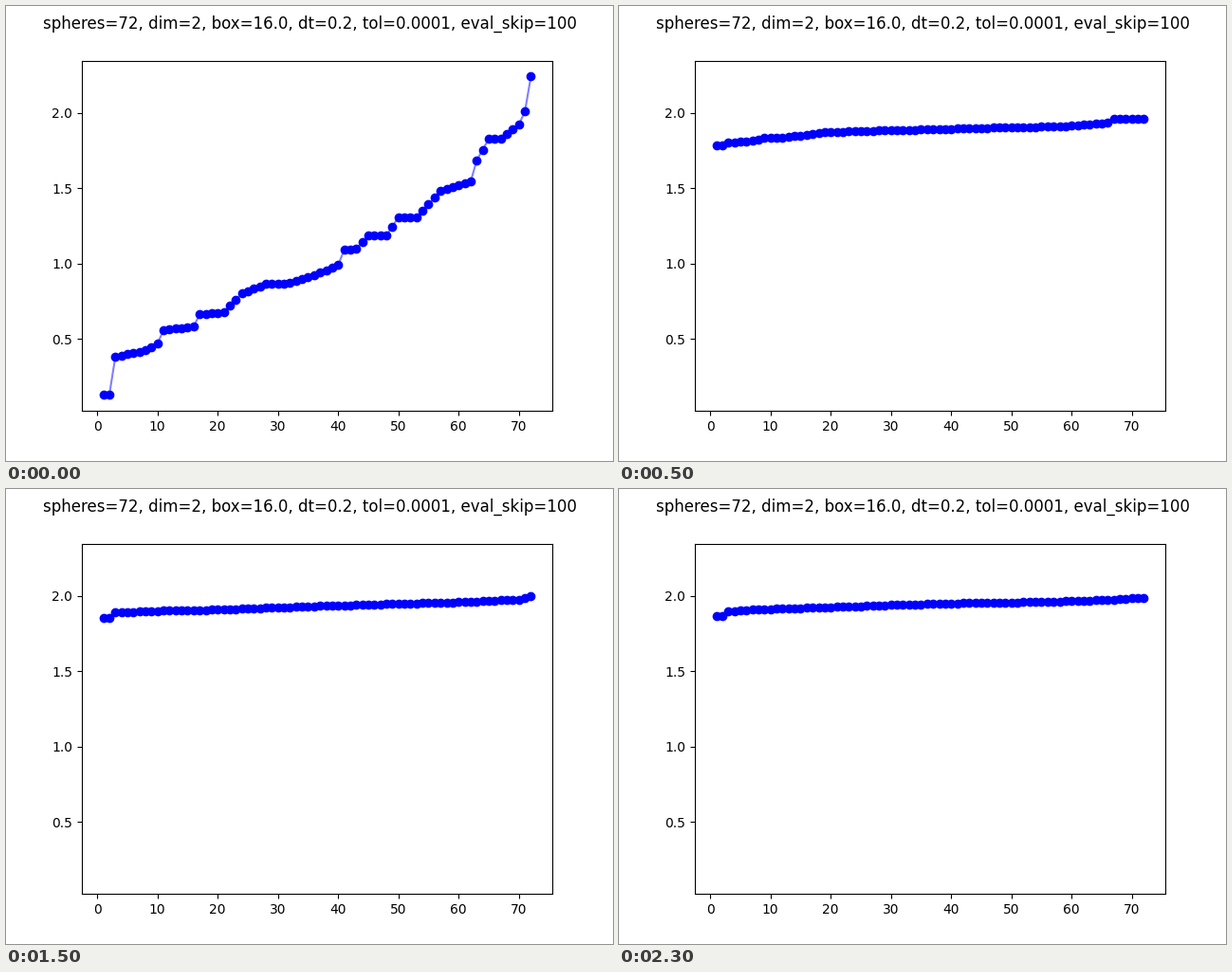
A matplotlib script for the animation above (2500 ms loop, 640 px wide and 480 px high).

```python
import numpy as np
import matplotlib.pyplot as plt
from matplotlib.animation import FuncAnimation

COUNT = 72
index = np.arange(1, COUNT + 1)


def curve(*knots):
    """Sorted distances, linear between (index, value) knots, flat outside."""
    return np.interp(index, *zip(*knots))


# Random start: an uneven climb with jumps between plateaus.
start = curve((2, .128), (3, .38), (8, .425), (10, .47), (11, .558),
              (16, .583), (17, .663), (21, .677), (24, .803), (28, .865),
              (32, .87), (36, .922), (40, .99), (41, 1.092), (43, 1.098),
              (45, 1.187), (48, 1.187), (50, 1.307), (53, 1.307),
              (57, 1.482), (62, 1.545), (63, 1.685), (65, 1.828),
              (67, 1.828), (70, 1.922), (71, 2.01), (72, 2.242))

# Later stages: nearly straight, with loose ends.
spread = curve((2, 1.783), (3, 1.802), (7, 1.815), (9, 1.834), (12, 1.836),
               (19, 1.871), (24, 1.879), (48, 1.903), (59, 1.911),
               (66, 1.935), (67, 1.96), (72, 1.962))
settle = curve((4, 1.865), (5, 1.872), (15, 1.885), (19, 1.903), (24, 1.909),
               (52, 1.941), (69, 1.96), (70, 1.985), (72, 1.991))
tighten = curve((2, 1.853), (3, 1.891), (12, 1.903), (20, 1.909),
                (38, 1.935), (50, 1.948), (61, 1.96), (70, 1.977),
                (72, 1.998))
final = curve((2, 1.865), (3, 1.897), (7, 1.909), (31, 1.941), (44, 1.954),
              (54, 1.96), (65, 1.972), (72, 1.989))

stages = (start, spread, settle, tighten, final)

fig, ax = plt.subplots(figsize=(6.4, 4.8), dpi=100)
fig.suptitle("spheres=72, dim=2, box=16.0, dt=0.2, tol=0.0001, eval_skip=100")
line, = ax.plot(index, start, "b-", alpha=0.5)
dots, = ax.plot(index, start, "bo")
# Keep the limits fitted to the first, widest stage.
ax.set_xlim(ax.get_xlim())
ax.set_ylim(ax.get_ylim())


def draw(i):
    for artist in (line, dots):
        artist.set_ydata(stages[i])
    return line, dots


anim = FuncAnimation(fig, draw, frames=len(stages), interval=500,
                     repeat=True, repeat_delay=0)
plt.show()
```
